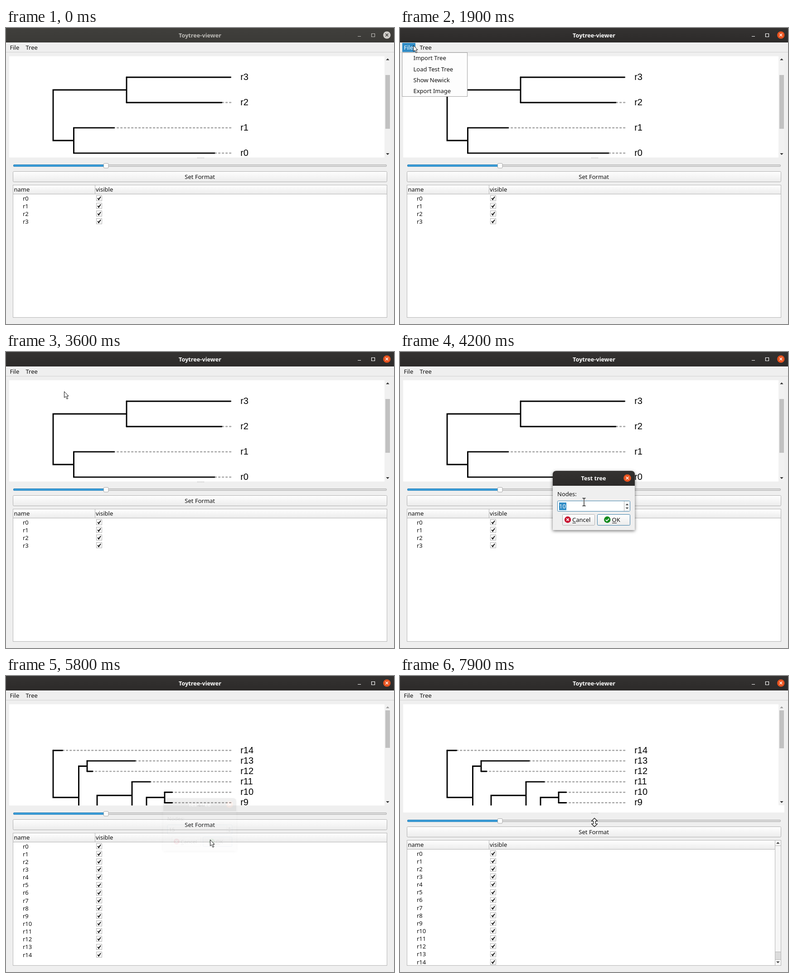
Animation, 856 px wide and 655 px high, one loop 8000 ms. Source, as an HTML page:

```html
<!DOCTYPE html>
<html lang="en">
<head>
<meta charset="utf-8">
<title>Toytree-viewer</title>
<style>
  html, body { margin: 0; width: 100%; height: 100%; overflow: hidden; background: #efefef; }
  svg { display: block; }
  text { font: 13px "Noto Sans", "Open Sans", sans-serif; fill: #111; white-space: pre; }
  .title { font-weight: 700; font-size: 12.7px; fill: #fff; text-anchor: middle; }
  .tip { font: 20px "Liberation Sans", Arial, sans-serif; fill: #000; }
  .mid { text-anchor: middle; }
  .on { fill: #fff; }
  .edge { fill: none; stroke: #000; stroke-width: 2.9; stroke-linecap: round; }
  .dash { fill: none; stroke: #a9a9a9; stroke-width: 2.7; stroke-linecap: round; stroke-dasharray: 2.67 5.33; }
  .line { fill: none; stroke: #b4b4b4; }
</style>
</head>
<body>
<svg width="856" height="655" viewBox="0 0 856 655">
  <defs>
    <linearGradient id="btn" x2="0" y2="1"><stop stop-color="#fefefe"/><stop offset="1" stop-color="#ececec"/></linearGradient>
    <linearGradient id="blue" x2="0" y2="1"><stop stop-color="#2f8fcb"/><stop offset="1" stop-color="#46aeea"/></linearGradient>
    <linearGradient id="bar" x2="0" y2="1"><stop stop-color="#343231"/><stop offset="1" stop-color="#2c2a29"/></linearGradient>
    <linearGradient id="dim" x2="0" y2="1"><stop stop-color="#403f3c"/><stop offset="1" stop-color="#3b3a37"/></linearGradient>
    <clipPath id="view"><rect x="7" y="62" width="828" height="224.5"/></clipPath>
    <clipPath id="list"><rect x="16" y="348" width="824" height="292"/></clipPath>
    <filter id="shadow" x="-20%" y="-20%" width="140%" height="140%">
      <feDropShadow dx="0" dy="2" stdDeviation="3.5" flood-opacity=".55"/>
    </filter>
  </defs>
  <rect width="856" height="655" fill="#efefef"/>

  <g id="idleBar"></g>
  <g id="liveBar"></g>

  <path d="M0 53.5H856" stroke="#d2d2d2"/>
  <rect id="fileBg" x="5" y="33" width="29" height="20" fill="#308cc6"/>
  <text id="file" x="8.5" y="48">File</text>
  <text x="43.5" y="48">Tree</text>

  <rect x="7" y="62.5" width="828" height="224" fill="#fff"/>
  <rect x="835" y="62.5" width="13" height="224" fill="#f1f1f1"/>
  <rect id="thumb" x="837" width="10" fill="#c1c1c1"/>
  <path id="upArrow" d="M838.3 71.3L842 67.3L845.7 71.3Z"/>
  <path d="M838.3 277L842 281L845.7 277Z" fill="#333"/>
  <rect id="gap" x="7" y="286" width="841" height="16" fill="#fff"/>
  <g clip-path="url(#view)"><g id="small"></g><g id="large"></g></g>

  <g id="lower">
    <path d="M422 287.5H437" stroke="#b8b8b8" stroke-width="1.4" stroke-dasharray="1.4 1.3"/>
    <rect x="16.5" y="302.5" width="823" height="4" rx="1.5" fill="#d9d9d9" stroke="#b3b3b3"/>
    <rect x="16.5" y="302.5" width="203" height="4" rx="1.5" fill="url(#blue)" stroke="#2c7fb4"/>
    <rect x="215.5" y="299.5" width="10.5" height="10.5" rx="2" fill="#fcfcfc" stroke="#a8a8a8"/>
    <rect x="15.5" y="317.5" width="825" height="23" rx="2" fill="url(#btn)" stroke="#b0b0b0"/>
    <text class="mid" x="427.7" y="333.5">Set Format</text>
  </g>

  <rect id="table" x="15.5" width="825" fill="#fff" stroke="#b4b4b4"/>
  <g clip-path="url(#list)"><g id="rows"></g></g>
  <g id="listBar">
    <rect x="827.5" y="363.5" width="13" height="277" fill="#dcdcdc" stroke="#b4b4b4"/>
    <rect x="827.5" y="363.5" width="13" height="12" fill="#f8f8f8" stroke="#b4b4b4"/>
    <rect x="827.5" y="375.5" width="13" height="235" fill="#f6f6f6" stroke="#b4b4b4"/>
    <rect x="827.5" y="627.5" width="13" height="13" fill="#f8f8f8" stroke="#b4b4b4"/>
    <path d="M830 371.3L833.8 367.3L837.6 371.3ZM830 631.5L833.8 635.5L837.6 631.5Z" fill="#444"/>
  </g>

  <g id="menu">
    <rect x="5" y="54.5" width="143.5" height="97" fill="#fdfdfd" stroke="#a0a0a0"/>
    <rect id="hover" x="5" width="143" height="24.3" fill="#308cc6"/>
  </g>

  <g id="dialog">
    <path d="M337 394V271Q337 263 345 263H510Q518 263 518 271V394Z" fill="#efefef" filter="url(#shadow)"/>
    <path d="M337 296V271Q337 263 345 263H510Q518 263 518 271V296Z" fill="url(#bar)"/>
    <text class="title" x="427" y="284">Test tree</text>
    <circle cx="501.5" cy="279" r="8.3" fill="#e95420"/>
    <path d="M498.5 276L504.5 282M504.5 276L498.5 282" stroke="#fff" stroke-width="1.4"/>
    <text x="347" y="319">Nodes:</text>
    <rect x="347.5" y="329.5" width="160" height="23" rx="2" fill="#fff" stroke="#3c7fa8"/>
    <path d="M494.5 330V352" stroke="#b8b8b8"/>
    <rect x="495" y="330" width="12" height="22" rx="1.5" fill="#f6f6f6"/>
    <path d="M497.8 339L501 335.5L504.2 339ZM497.8 344L501 347.5L504.2 344Z" fill="#444"/>
    <rect id="select" x="351" y="333" width="16" height="17" fill="#308cc6"/>
    <text id="value" x="351" y="346.3"></text>
    <path id="caret" d="M0 334V349" stroke="#000"/>
    <rect x="358.5" y="359.5" width="71" height="24" rx="2" fill="url(#btn)" stroke="#b0b0b0"/>
    <circle cx="370" cy="371" r="7.2" fill="#c8102e"/>
    <path d="M367.3 368.3L372.7 373.7M372.7 368.3L367.3 373.7" stroke="#fff" stroke-width="1.7"/>
    <text x="380" y="376">Cancel</text>
    <path d="M380.5 378.5H388" stroke="#111"/>
    <rect id="ok" x="435.5" y="359.5" width="72" height="24" rx="2" fill="url(#btn)" stroke="#3c7fa8"/>
    <circle cx="457.3" cy="371" r="7.2" fill="#118a1e"/>
    <path d="M453.7 371.2L456.3 373.8L461 368.8" fill="none" stroke="#fff" stroke-width="1.8"/>
    <text x="467.5" y="376">OK</text>
    <path d="M468 378.5H478" stroke="#111"/>
  </g>

  <g id="pointer">
    <path id="arrow" d="M.5 .5V14L3.7 11.2L6.2 17L8.7 16L6.2 10.4H10Z" fill="#fff" stroke="#111" stroke-linejoin="round"/>
    <g id="beam" fill="none">
      <path d="M-3.5 -8.5H-1Q0 -8.5 0 -7V7Q0 8.5 -1 8.5H-3.5M3.5 -8.5H1Q0 -8.5 0 -7M0 7Q0 8.5 1 8.5H3.5" stroke="#fff" stroke-width="3"/>
      <path d="M-3.5 -8.5H-1Q0 -8.5 0 -7V7Q0 8.5 -1 8.5H-3.5M3.5 -8.5H1Q0 -8.5 0 -7M0 7Q0 8.5 1 8.5H3.5" stroke="#111" stroke-width="1.3"/>
    </g>
    <path id="resize" d="M0 -9.5L6.5 -3H2.2V3H6.5L0 9.5L-6.5 3H-2.2V-3H-6.5Z" fill="#fff" stroke="#111" stroke-width="1.2" stroke-linejoin="round"/>
  </g>
</svg>
<script>
const $ = id => document.getElementById(id);
const show = (id, on) => $(id).style.display = on ? "" : "none";
const attr = (id, values) => { for (const k in values) $(id).setAttribute(k, values[k]); };
const range = n => [...Array(n).keys()];

const titleBar = (fill, ink, disc, cross) => `
  <rect width="856" height="32" fill="url(#${fill})"/>
  <text class="title" x="428" y="20.5" style="fill:${ink}">Toytree-viewer</text>
  <path d="M776 18.5H783M806.5 12.5H813.5V19.5H806.5Z" fill="none" stroke="${ink}" stroke-width="1.2"/>
  <circle cx="840.3" cy="15.6" r="8.2" fill="${disc}"/>
  <path d="M837.3 12.6L843.3 18.6M843.3 12.6L837.3 18.6" stroke="${cross}" stroke-width="1.4"/>`;
$("idleBar").innerHTML = titleBar("dim", "#bcbab6", "#cfcdc9", "#3c3b38");
$("liveBar").innerHTML = titleBar("bar", "#fff", "#e95420", "#fff");

// tips: [name, left x, right x] from the top row down
function tree(id, top, step, tips, inner) {
  let out = "";
  tips.forEach(([name, x1, x2], i) => {
    const y = top + i * step;
    out += `<path class="dash" d="M496 ${y}H${x2}"/><path class="edge" d="M${x1} ${y}H${x2}"/>
      <text class="tip" x="517.2" y="${y + 5.8}">${name}</text>`;
  });
  $(id).innerHTML = out + `<path class="edge" d="${inner}"/>`;
}
tree("small", 109, 55.95,
  [["r3", 266, 495.5], ["r2", 266, 476], ["r1", 149.5, 238.5], ["r0", 149.5, 460]],
  "M266 109V165M266 137H104V249H149.5M149.5 221V277");
tree("large", 164.7, 23.15,
  [["r14", 104, 124.5], ["r13", 179, 285], ["r12", 179, 191], ["r11", 278, 318], ["r10", 350, 366.5], ["r9", 350, 366.5]],
  "M104 164.7V268.7H160.5M179 199.5H160.5V300M179 187.8V211M278 264.3H201V300M278 234.1V300M350 268.7H310V300M350 257.3V280.5");

const rowY = i => 376.8 + i * 17.14;
$("rows").innerHTML = `
  <rect x="16" y="348" width="824" height="19.5" fill="url(#btn)"/>
  <path class="line" d="M16 367.5H840M196.5 348V367"/>
  <text x="17.5" y="362">name</text><text x="198" y="362">visible</text>` +
  range(15).map(i => `<g id="row${i}">
    <text x="37" y="${rowY(i) + 4.8}">r${i}</text>
    <g transform="translate(199.5 ${Math.round(rowY(i)) - 6.5})">
      <rect width="12" height="12" fill="#fff" stroke="#b0b0b0"/>
      <path d="M2.8 6L5 9.3L9.4 2.8" fill="none" stroke="#111" stroke-width="2"/>
    </g></g>`).join("");

const items = ["Import Tree", "Load Test Tree", "Show Newick", "Export Image"];
$("menu").innerHTML += items.map((s, i) =>
  `<text id="item${i}" x="29.5" y="${71.3 + i * 24.3}">${s}</text>`).join("");

// time, x, y of the pointer
const path = [
  [300, 41, 11], [400, 38, 23], [500, 38, 23], [700, 32, 32], [1200, 32, 32], [1500, 29, 38],
  [1900, 29, 38], [2100, 42, 56], [2300, 78, 75], [2500, 104, 84], [2600, 107, 84.5],
  [2700, 107, 84.5], [2900, 128, 87], [3700, 128, 87], [3900, 250, 195], [4100, 392, 320],
  [4200, 406, 332], [4400, 430, 341], [4900, 430, 341], [5200, 446, 357], [5400, 450, 362],
  [5800, 450, 362], [6100, 440, 334], [6400, 430, 306], [6500, 427, 294], [6600, 427, 294],
  [6900, 427, 288], [7200, 427, 288], [7500, 425, 288], [7800, 425, 288], [7900, 429, 324]
];
// time, opacity, scale of the dialog
const fade = [
  [3600, 0, .85], [3700, .3, .91], [3800, .8, .97], [3900, 1, 1],
  [5600, 1, 1], [5700, .5, .95], [5800, .07, .89], [5900, 0, .85]
];

function at(table, t) {
  const i = table.findIndex(k => k[0] > t);
  if (i === 0) return table[0].slice(1);
  if (i < 0) return table[table.length - 1].slice(1);
  const a = table[i - 1], b = table[i], p = (t - a[0]) / (b[0] - a[0]);
  return a.slice(1).map((v, k) => v + (b[k + 1] - v) * p);
}

function draw(t) {
  const [x, y] = at(path, t);
  const grown = t >= 5700, drag = t >= 7900 ? 16 : 0;

  $("liveBar").style.opacity = Math.max(0, Math.min(1, (t - 1600) / 300));

  const open = t >= 1800 && t < 3600, fileOn = t >= 1700 && t < 3600;
  show("fileBg", fileOn);
  $("file").classList.toggle("on", fileOn);
  show("menu", open);
  const pick = y < 55 ? -1 : Math.min(3, Math.floor((y - 54.5) / 24.3));
  show("hover", pick >= 0);
  attr("hover", { y: 54.5 + Math.max(0, pick) * 24.3 });
  items.forEach((s, i) => $("item" + i).classList.toggle("on", i === pick));

  show("small", !grown);
  show("large", grown);
  attr("thumb", grown ? { y: 76, height: drag ? 84 : 83 } : { y: 104, height: 119 });
  attr("upArrow", { fill: grown ? "#9a9a9a" : "#333" });
  range(15).forEach(i => show("row" + i, grown || i < 4));

  show("gap", drag);
  show("listBar", drag);
  attr("lower", { transform: `translate(0 ${drag})` });
  attr("rows", { transform: `translate(0 ${drag})` });
  attr("table", { y: 347.5 + drag, height: 293 - drag });

  const [alpha, scale] = at(fade, t);
  show("dialog", alpha > 0);
  $("dialog").style.opacity = alpha;
  attr("dialog", { transform: `translate(427.5 328) scale(${scale}) translate(-427.5 -328)` });
  const typed = t < 4600 ? "10" : t < 4800 ? "1" : "15";
  $("value").textContent = typed;
  $("value").classList.toggle("on", t < 4600);
  show("select", t < 4600);
  show("caret", t >= 4600 && t < 5300);
  attr("caret", { transform: `translate(${351.5 + typed.length * 7.5} 0)` });
  attr("ok", { fill: t >= 5600 ? "#dcdcdc" : t >= 5200 ? "#fdfdfd" : "url(#btn)" });

  const kind = t >= 7400 ? "resize" : t >= 4200 && t < 5200 ? "beam" : "arrow";
  show("pointer", t >= 300);
  ["arrow", "beam", "resize"].forEach(k => show(k, k === kind));
  attr("pointer", { transform: `translate(${x} ${y})` });
}

const start = performance.now();
function tick() {
  const t = (performance.now() - start) % 8000;
  draw(Math.floor(t / 100) * 100);
  requestAnimationFrame(tick);
}
tick();
</script>
</body>
</html>
```
